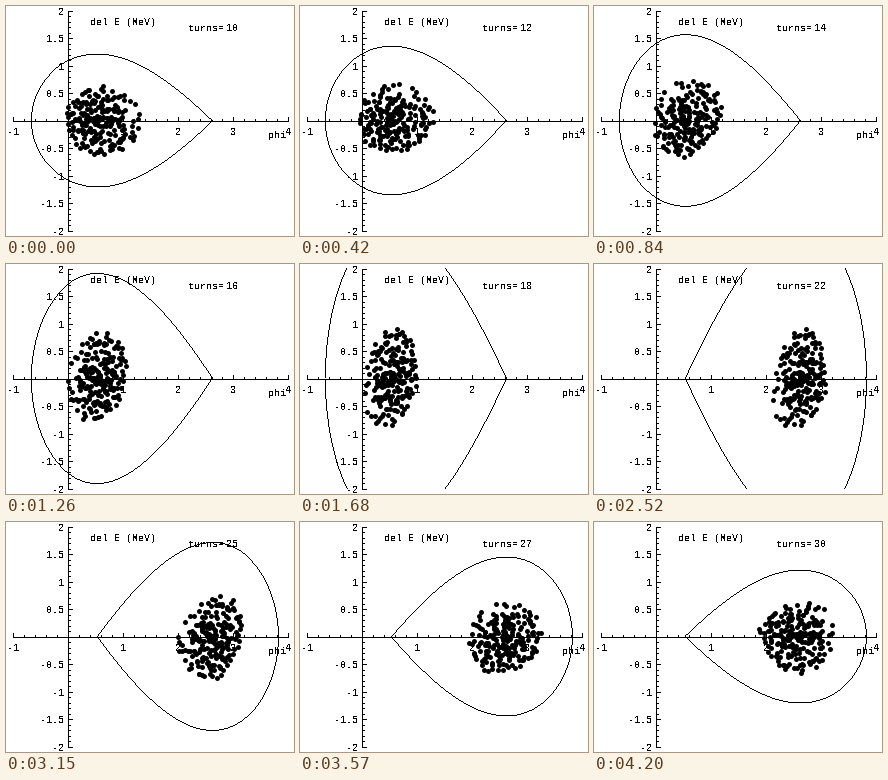
Recreate the animation shown at these times as a matplotlib script. Size 288 by 230 pixels, loop 4410 ms.

```python
import numpy as np
import matplotlib.pyplot as plt
from matplotlib.animation import FuncAnimation

plt.rcParams.update({
    "font.family": "Liberation Mono",
    "text.antialiased": False,
    "text.hinting": "default",
})

W, H, DPI = 288, 230, 64
PX = 72 / DPI                      # points per pixel
X0, Y0, UNIT = 62, 114, 55         # origin and pixels per axis unit
FRAMES, CROSSING, FIRST_TURN = 21, 10, 10
PHI_S = np.pi / 6                  # synchronous phase before transition
VOLTAGE, BUCKET = 0.6, 3.82        # kick per turn, bucket height one turn from crossing


def sx(phi):
    return X0 + UNIT * np.asarray(phi)


def sy(energy):
    return Y0 - UNIT * np.asarray(energy)


def potential(phi):
    return np.cos(phi) + np.cos(PHI_S) + (phi + PHI_S - np.pi) * np.sin(PHI_S)


SLIP = 2 * VOLTAGE * potential(PHI_S) / BUCKET**2


def track(count=200, seed=5):
    """Particle phases and energies after each turn."""
    rng = np.random.default_rng(seed)
    r = 0.68 * rng.random(count) ** 0.72
    angle = np.arange(count) * np.pi * (3 - np.sqrt(5))
    phi = PHI_S + r * np.cos(angle) + 0.2 * r**2
    energy = 0.95 * r * np.sin(angle)

    def half_kick():
        return VOLTAGE / 2 * (np.sin(phi) - np.sin(PHI_S))

    states = [(phi, energy)]
    for turn in range(FRAMES - 1):
        if turn == CROSSING:
            phi = phi + np.pi - 2 * PHI_S
        energy = energy + half_kick()
        phi = phi - SLIP * (CROSSING - turn - 0.5) * energy
        energy = energy + half_kick()
        states.append((phi, energy))
    return states


def trace(x, y):
    """Resample a curve to a chain of single pixels."""
    steps = np.maximum(np.abs(np.diff(x)), np.abs(np.diff(y)))
    length = np.concatenate([[0], np.cumsum(steps)])
    at = np.arange(0, length[-1])
    return np.rint(np.interp(at, length, x)), np.rint(np.interp(at, length, y))


def separatrix(turn):
    distance = abs(CROSSING - turn)
    if distance == 0:
        return [], []
    low, high = -0.6752, np.pi - PHI_S
    t = np.linspace(0, 2 * np.pi, 361)
    phi = (low + high) / 2 - (high - low) / 2 * np.cos(t)
    shape = np.sqrt(np.maximum(potential(phi), 0) / potential(PHI_S))
    energy = BUCKET / np.sqrt(distance) * shape * np.where(t < np.pi, 1, -1)
    if turn > CROSSING:
        phi = np.pi - phi
    x, y = trace(sx(phi), sy(energy))
    inside = np.abs(y - Y0) <= 2 * UNIT
    return x[inside], y[inside]


fig = plt.figure(figsize=(W / DPI, H / DPI), dpi=DPI, facecolor="white")
ax = fig.add_axes([0, 0, 1, 1])
# Just under half a pixel, so whole coordinates snap to their own pixel.
ax.set_xlim(-0.45, W - 0.45)
ax.set_ylim(H - 0.55, -0.55)
ax.axis("off")
stroke = dict(color="black", lw=PX, antialiased=False)


def label(x, y, text, ha="left"):
    return ax.text(x, y, text, ha=ha, va="baseline", fontsize=10 * PX, color="black")


def draw_axes():
    ax.hlines(Y0, sx(-1), sx(4), **stroke)
    ax.vlines(X0, sy(2), sy(-2), **stroke)
    for step, size in ((0.2, 2), (1, 4)):
        ax.vlines(sx(np.arange(-1, 4.01, step)), Y0 - size, Y0, **stroke)
    for step, size in ((0.1, 2), (0.5, 4)):
        ax.hlines(sy(np.arange(-2, 2.01, step)), X0, X0 + size, **stroke)
    for value in (-1, 1, 2, 3, 4):
        label(sx(value), Y0 + 14, f"{value}", "center")
    for value in (-2, -1.5, -1, -0.5, 0.5, 1, 1.5, 2):
        label(58, sy(value) + 4, f"{value:g}", "right")
    label(262, 131, "phi")
    label(84, 18, "del E (MeV)")
    label(182, 24, "turns=")


draw_axes()
counter = label(220, 24, "")
bucket, = ax.plot([], [], ",", color="black", antialiased=False)
dots, = ax.plot([], [], "o", color="black", ms=5 * PX, mew=0, antialiased=False)
states = track()


def update(turn):
    phi, energy = states[turn]
    dots.set_data(sx(phi), sy(energy))
    bucket.set_data(*separatrix(turn))
    counter.set_text(str(FIRST_TURN + turn))
    return dots, bucket, counter


anim = FuncAnimation(fig, update, frames=FRAMES, interval=210, repeat=True, repeat_delay=0)
plt.show()
```
